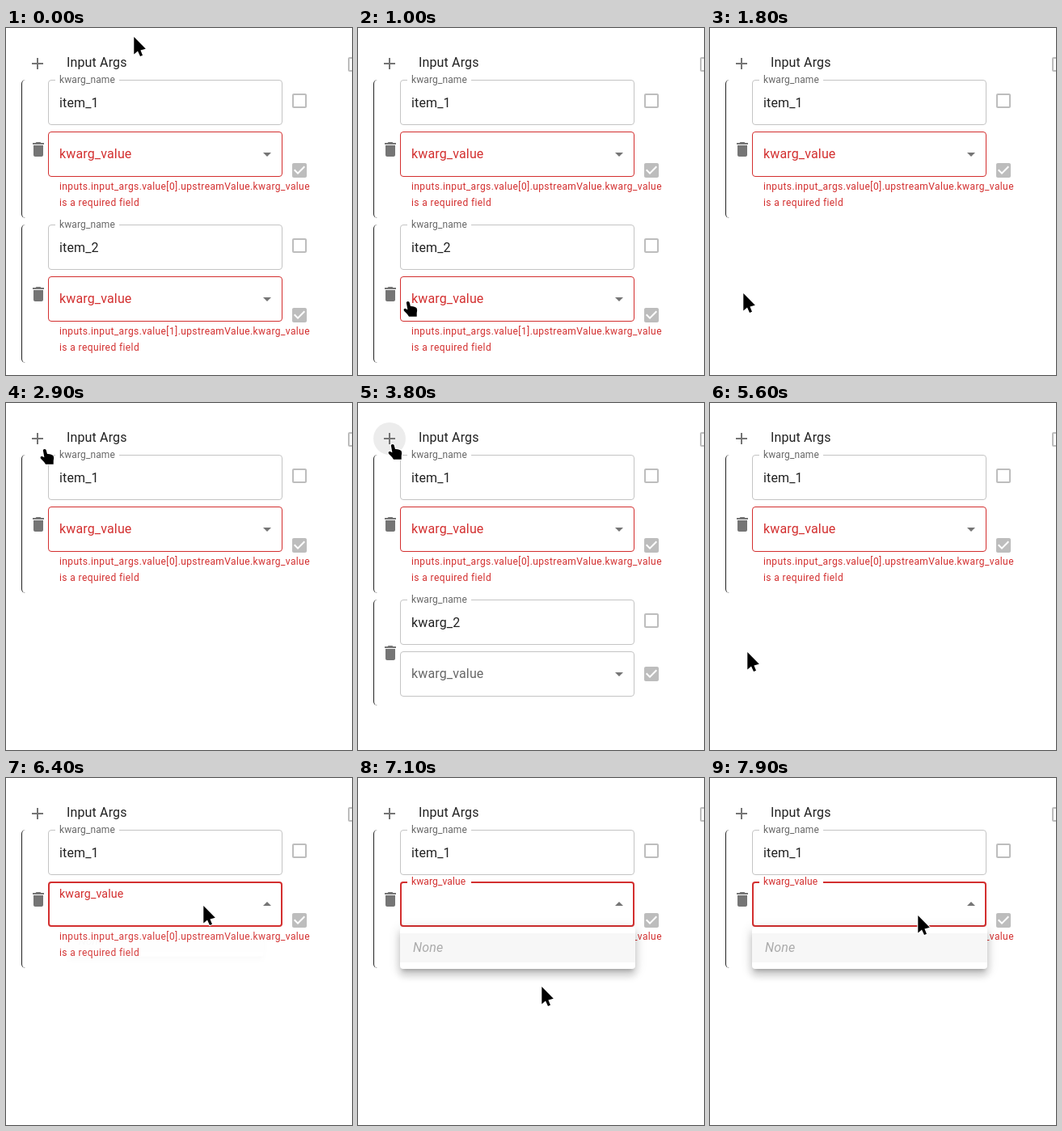
Recreate the animation shown at these times as an HTML page. Size 428 by 429 pixels, loop 8 s.

```html
<!DOCTYPE html>
<html lang="en">
<head>
<meta charset="utf-8">
<title>Input Args</title>
<style>
html, body { margin: 0; width: 100%; height: 100%; overflow: hidden; background: #fff; }
#stage {
  position: relative; width: 428px; height: 429px; overflow: hidden; background: #fff;
  font: 16px/23px Roboto, Arial, sans-serif; letter-spacing: .15px; color: rgba(0,0,0,.87);
}
#stage div, #stage svg { position: absolute; box-sizing: border-box; white-space: nowrap; }
svg { overflow: visible; }
.title { left: 75px; top: 30.5px; line-height: 24px; }
.halo { left: 19px; top: 24px; width: 40px; height: 40px; border-radius: 50%; }
.item { left: 0; width: 428px; }
.bracket { left: 19px; top: 0; width: 30px; height: 100%; border-left: 1px solid #222; border-radius: 5px; }
.field { left: 52px; width: 290px; height: 56px; }
.edge { inset: 0; border: 1px solid #c4c4c4; border-radius: 4px; }
.hover .edge { border-color: #212121; }
.error .edge { border-color: #d32f2f; }
.focus .edge { border-width: 2px; top: -.5px !important; }
.notch { left: 9px; top: -1px; width: 79px; height: 4px; background: #fff; }
.label { left: 0; top: 0; color: rgba(0,0,0,.6); transform-origin: 0 0; }
.error .label { color: #d32f2f; }
.value { left: 14px; top: 16.5px; }
.help { left: 66px; top: 123px; font-size: 12px; line-height: 19.92px; letter-spacing: .4px; color: #d32f2f; }
.menu {
  left: 52px; top: 184px; width: 291px; height: 52px; border-radius: 4px; background: #fff;
  transform-origin: 50% 0;
  box-shadow: 0 5px 5px -3px rgba(0,0,0,.2), 0 8px 10px 1px rgba(0,0,0,.14), 0 3px 14px 2px rgba(0,0,0,.12);
}
.none { left: 0; top: 8px; width: 100%; height: 36px; padding-left: 16px; line-height: 36px;
  font-style: italic; background: #f7f7f7; color: #ababab; }
</style>
</head>
<body>
<div id="stage"></div>
<script>
const LOOP = 8000, STEP = 100;
const REMOVE_FIRST = 1700, ADD = 3400, REMOVE_SECOND = 5400, OPEN = 6400;
const GREY = '#757575', PALE = '#bdbdbd';

const ICONS = {
  plus: 'M19 13h-6v6h-2v-6H5v-2h6V5h2v6h6v2z',
  trash: 'M6 19c0 1.1.9 2 2 2h8c1.1 0 2-.9 2-2V7H6v12zM19 4h-3.5l-1-1h-5l-1 1H5v2h14V4z',
  box: 'M19 5v14H5V5h14m0-2H5c-1.1 0-2 .9-2 2v14c0 1.1.9 2 2 2h14c1.1 0 2-.9 2-2V5c0-1.1-.9-2-2-2z',
  tick: 'M19 3H5c-1.1 0-2 .9-2 2v14c0 1.1.9 2 2 2h14c1.1 0 2-.9 2-2V5c0-1.1-.9-2-2-2zm-9 14l-5-5 1.41-1.41L10 14.17l7.59-7.59L19 8l-9 9z',
  drop: 'M7 10l5 5 5-5z'
};
const POINTERS = {
  arrow: 'M.3 0V21.5L5 17.6L8 24L11 22.7L8.4 16.5L14.8 14.8Z',
  hand: 'M-2.2 1.2Q-.6-1.2 1.5.8L3 6Q8.500 5.800 10.700 8.500Q11.700 11 10.700 14.500V18.800H1Q-.5 16-5 11.800Q-6.200 9.200-3.800 8.700L-.6 10.200Z',
  beam: 'M-3-9H3V-7.500H.8V7.500H3V9H-3V7.500H-.8V-7.500H-3Z'
};

// time, x, y of the pointer's hot spot
const TRACK = [
  [300, 158, 11], [400, 214, 34], [500, 262, 146], [600, 268, 214], [700, 210, 312],
  [800, 150, 318], [1000, 62, 338], [1200, 39, 331], [1300, 40, 330], [1700, 40, 330],
  [1800, 41, 328], [2000, 41, 328], [2200, 56, 240], [2400, 52, 141], [2500, 52, 141],
  [2600, 56, 70], [2700, 56, 70], [2800, 50, 61], [2900, 48, 57], [3100, 43, 51],
  [4300, 43, 51], [4500, 58, 119], [4700, 76, 205], [4800, 78, 270], [4900, 72, 328],
  [5000, 63, 342], [5200, 40, 310], [5300, 46, 308], [5800, 46, 308], [6100, 200, 190],
  [6300, 244, 158], [6500, 244, 158], [6700, 240, 204], [7000, 214, 256], [7200, 240, 260],
  [7400, 280, 235], [7600, 232, 214], [7900, 257, 170]
];

const stage = document.getElementById('stage');

function div(parent, cls, text = '') {
  const el = document.createElement('div');
  el.className = cls;
  el.textContent = text;
  parent.append(el);
  return el;
}

function svg(parent, d, fill) {
  const el = document.createElementNS('http://www.w3.org/2000/svg', 'svg');
  el.setAttribute('width', 24);
  el.setAttribute('height', 24);
  el.innerHTML = `<path d="${d}" fill="${fill}"/>`;
  parent.append(el);
  return el;
}

function icon(parent, name, cx, cy, fill) {
  const el = svg(parent, ICONS[name], fill);
  el.style.left = cx - 12 + 'px';
  el.style.top = cy - 12 + 'px';
  return el;
}

function setLabel(field, p) {
  field.label.style.transform = `translate(14px, ${16 - 25 * p}px) scale(${1 - .25 * p})`;
  field.notch.style.display = p === 1 ? '' : 'none';
}

function makeField(item, top, name, value, error) {
  const el = div(item, 'field' + (error ? ' error' : ''));
  el.style.top = top + 'px';
  div(el, 'edge');
  const field = { el, notch: div(el, 'notch'), label: div(el, 'label', name) };
  if (value) div(el, 'value', value);
  setLabel(field, value ? 1 : 0);
  return field;
}

function makeItem(y, name, index) {
  const error = index !== undefined;
  const h = error ? 171 : 131;
  const el = div(stage, 'item');
  el.style.top = y + 'px';
  el.style.height = h + 'px';
  div(el, 'bracket');
  icon(el, 'trash', 40, h / 2, GREY);
  const text = makeField(el, 0, 'kwarg_name', name);
  const select = makeField(el, 64, 'kwarg_value', '', error);
  const drop = icon(select.el, 'drop', 271, 28, GREY);
  icon(el, 'box', 363, 26, PALE);
  icon(el, 'tick', 363, error ? 112 : 92, PALE);
  if (error) {
    div(el, 'help').innerHTML =
      `inputs.input_args.value[${index}].upstreamValue.kwarg_value<br>is a required field`;
  }
  return { el, y, h, text, select, drop };
}

const halo = div(stage, 'halo');
icon(stage, 'plus', 39, 44, GREY);
div(stage, 'title', 'Input Args');
icon(stage, 'box', 432, 45, PALE);
const first = makeItem(64, 'item_1', 0);
const second = makeItem(243, 'item_2', 1);
const added = makeItem(243, 'kwarg_2');
const menu = div(stage, 'menu');
div(menu, 'none', 'None');

const pointers = {};
for (const kind in POINTERS) {
  const el = pointers[kind] = svg(stage, POINTERS[kind], '#000');
  el.style.left = el.style.top = 0;
  const path = el.firstChild;
  path.setAttribute('stroke', '#fff');
  path.setAttribute('stroke-width', 2);
  path.setAttribute('stroke-linejoin', 'round');
  path.setAttribute('paint-order', 'stroke');
}

function pointerAt(t) {
  const i = TRACK.findIndex(k => k[0] > t);
  if (i === 0) return TRACK[0].slice(1);
  if (i < 0) return TRACK[TRACK.length - 1].slice(1);
  const [t0, x0, y0] = TRACK[i - 1], [t1, x1, y1] = TRACK[i];
  const p = (t - t0) / (t1 - t0);
  return [x0 + (x1 - x0) * p, y0 + (y1 - y0) * p];
}

const inField = (x, y, top) => x >= 52 && x < 342 && y >= top && y < top + 56;
const inRound = (x, y, cx, cy) => Math.hypot(x - cx, y - cy) < 20;

function render(t) {
  const [x, y] = pointerAt(t);
  const open = t >= OPEN;
  let kind = !open && inRound(x, y, 39, 44) ? 'hand' : 'arrow';

  const visible = new Map([
    [first, true],
    [second, t < REMOVE_FIRST],
    [added, t >= ADD && t < REMOVE_SECOND]
  ]);
  for (const [item, shown] of visible) {
    item.el.style.display = shown ? '' : 'none';
    const live = shown && !open;
    const onText = live && inField(x, y, item.y);
    const onSelect = live && inField(x, y, item.y + 64);
    item.text.el.classList.toggle('hover', onText);
    item.select.el.classList.toggle('hover', onSelect);
    if (onText) kind = 'beam';
    if (onSelect || live && inRound(x, y, 40, item.y + item.h / 2)) kind = 'hand';
  }

  const shade = t < 3000 || t >= 4400 ? 0 : t < 3300 ? .04 : t < 3500 ? .1 : .075;
  halo.style.background = `rgba(0,0,0,${shade})`;

  // Opening takes two steps: label shrinks while the menu grows
  const step = Math.floor((t - OPEN) / STEP);
  first.select.el.classList.toggle('focus', open);
  first.drop.style.transform = open ? 'rotate(180deg)' : '';
  setLabel(first.select, !open ? 0 : step === 0 ? .45 : 1);
  const grow = [.33, .85][step] ?? 1;
  menu.style.display = open ? '' : 'none';
  menu.style.opacity = [.06, .7][step] ?? 1;
  menu.style.transform = `scale(${.75 + .25 * grow}, ${.5625 + .4375 * grow})`;

  for (const k in pointers) pointers[k].style.display = k === kind ? '' : 'none';
  pointers[kind].style.transform = `translate(${Math.round(x)}px, ${Math.round(y)}px)`;
}

const start = performance.now();
function tick() {
  const t = (performance.now() - start) % LOOP;
  render(Math.floor(t / STEP) * STEP);
  requestAnimationFrame(tick);
}
tick();
</script>
</body>
</html>
```
